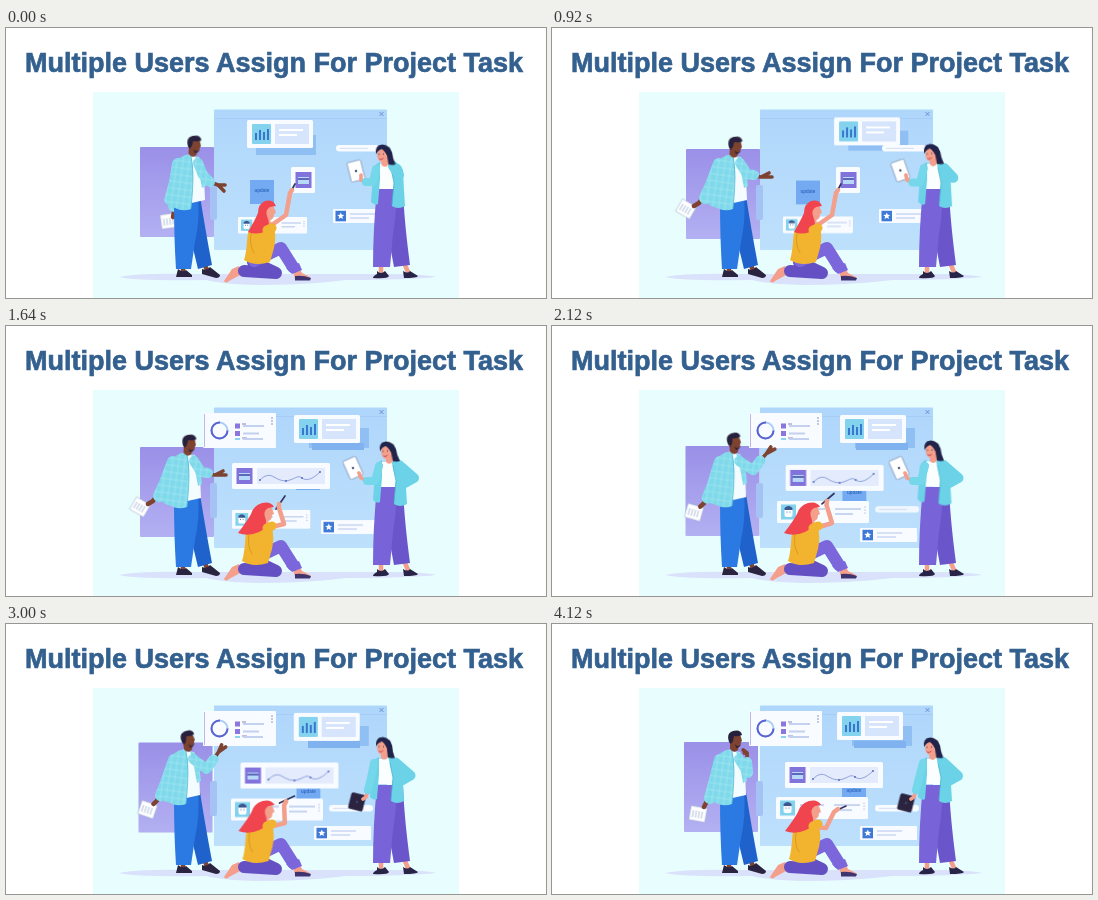
Animation, 540 px wide and 270 px high, one loop 4.16 s. Source, as an HTML page without scripts:

```html
<!DOCTYPE html>
<html lang="en">
<head>
<meta charset="utf-8">
<title>Project tasks</title>
<style>
html, body { margin: 0; width: 100%; height: 100%; overflow: hidden; background: #fff; }
svg { display: block; width: 540px; height: 270px; }
.title { font: bold 27px "Liberation Sans", Arial, sans-serif; fill: #33608f; stroke: #33608f; stroke-width: .7; }
.m { animation: 4.16s ease-in-out infinite; }
.line { fill: none; stroke-linecap: round; stroke-linejoin: round; }
.dark { --skin: #7d4330; }
.fair { --skin: #f39f8b; }
.skin { fill: var(--skin); }
.limb { stroke: var(--skin); stroke-width: 4.5; }
.card { fill: #f8fbff; }

/* Board */
#side { animation-name: side; }
@keyframes side {
  0% { transform: translate(134px, 119px); }
  13.5%, 39.4% { transform: translate(134px, 121px); }
  62.5% { transform: translate(133px, 119px); }
  82%, 100% { transform: translate(132px, 118px); }
}
#bars, #shade { animation-timing-function: cubic-bezier(.65, 0, .35, 1); }
#bars { animation-name: bars; }
@keyframes bars {
  0%, 5.4% { transform: translate(241px, 92px); }
  29.8%, 62.5% { transform: translate(288px, 89px); }
  100% { transform: translate(285px, 88px); }
}
#shade { animation-name: shade; }
@keyframes shade {
  0%, 5.4% { transform: translate(250px, 107px); }
  29.8%, 62.5% { transform: translate(303px, 102px); }
  100% { transform: translate(300px, 102px); }
}
#strip { animation-name: strip; }
@keyframes strip {
  0%, 29.8% { transform: translate(330px, 117px); opacity: 0; }
  39.4% { transform: translate(306px, 117px); opacity: 1; }
  62.5%, 100% { transform: translate(302px, 117px); opacity: 1; }
}
#pill { animation-name: pill; }
@keyframes pill {
  0%, 29.8% { transform: translate(330px, 117px); opacity: 1; }
  37% { transform: translate(330px, 124px); opacity: 0; }
  45% { transform: translate(324px, 174px); opacity: 0; }
  53%, 100% { transform: translate(323px, 181px); opacity: 1; }
}
#note { animation-name: note; }
@keyframes note {
  0%, 13.5% { transform: translate(244px, 152px); }
  30% { transform: translate(244px, 153px); }
  39.4%, 41% { transform: translate(290px, 140px); }
  53%, 82% { transform: translate(290.5px, 157px); }
  100% { transform: translate(290px, 156px); }
}
#plot { animation-name: plot; }
@keyframes plot {
  0% { transform: translate(285px, 139px); }
  13.5%, 26% { transform: translate(284px, 139px); animation-timing-function: ease-in; }
  29.8% { transform: translate(280px, 139px); animation-timing-function: ease-out; }
  39.4% { transform: translate(226px, 137px); }
  53%, 62.5% { transform: translate(234px, 139px); }
  82% { transform: translate(235px, 138px); }
  100% { transform: translate(233px, 138px); }
}
#plotbox { animation-name: plotbox; }
@keyframes plotbox {
  0%, 26% { width: 24px; animation-timing-function: ease-in; }
  29.8% { width: 34px; animation-timing-function: ease-out; }
  39.4%, 100% { width: 98px; }
}
#curve { animation-name: curve; }
@keyframes curve {
  0%, 34% { opacity: 0; }
  39%, 100% { opacity: 1; }
}
#ring { animation-name: ring; }
@keyframes ring {
  0%, 23% { transform: translate(198px, 92px); opacity: 0; }
  29%, 100% { transform: translate(197px, 87px); opacity: 1; }
}
#ringfill { animation-name: ringfill; }
@keyframes ringfill {
  0%, 30% { opacity: 0; }
  38%, 100% { opacity: 1; }
}
#arc { animation-name: arc; stroke-dasharray: 38 100; }
@keyframes arc {
  0%, 30% { stroke-dashoffset: 38; }
  39.4%, 100% { stroke-dashoffset: 0; }
}
#row { animation-name: row; }
@keyframes row {
  0%, 13.5% { transform: translate(232px, 189px) scale(.75); }
  29.8% { transform: translate(230px, 188px) scale(.77); animation-timing-function: ease-in; }
  39.4% { transform: translate(226px, 184px) scale(.85); animation-timing-function: ease-out; }
  51%, 62.5% { transform: translate(225px, 175px) scale(1); }
  82% { transform: translate(225px, 174px) scale(1); }
  100% { transform: translate(224px, 173px) scale(1); }
}
#star { animation-name: star; }
@keyframes star {
  0%, 28% { transform: translate(327px, 181px); animation-timing-function: ease-in; }
  39.4% { transform: translate(315px, 194px); animation-timing-function: ease-out; }
  51%, 100% { transform: translate(308px, 202px); }
}

/* Man */
#mtop { animation-name: mtop; }
@keyframes mtop {
  0% { transform: translate(5px, 0); }
  13.5%, 41% { transform: translate(1px, 0); }
  54%, 100% { transform: translate(0, -1px); }
}
#mhead { animation-name: mhead; }
@keyframes mhead {
  0% { transform: translate(188px, 118px) rotate(4deg); }
  13.5%, 41% { transform: translate(183px, 119px) rotate(4deg); }
  54%, 82% { transform: translate(182px, 117px) rotate(-7deg); }
  100% { transform: translate(183px, 117px) rotate(0deg); }
}
#sheet { animation-name: sheet; }
@keyframes sheet {
  0% { transform: translate(163px, 193px) rotate(-8deg); }
  13.5%, 41% { transform: translate(134px, 181px) rotate(30deg); }
  54%, 62.5% { transform: translate(143px, 187px) rotate(14deg); }
  82% { transform: translate(140px, 184px) rotate(24deg); }
  100% { transform: translate(146px, 190px) rotate(10deg); }
}
#mback { animation-name: mback; }
@keyframes mback {
  0% { d: path("M172 136L168 162L168 178"); }
  13.5%, 41% { d: path("M167 136L159 157L153 170"); }
  54%, 62.5% { d: path("M168 136L161 160L156 172"); }
  82% { d: path("M168 136L159 158L154 171"); }
  100% { d: path("M168 136L162 160L158 174"); }
}
#mbackhand { animation-name: mbackhand; }
@keyframes mbackhand {
  0% { d: path("M168 176L168 184L167 189"); }
  13.5%, 41% { d: path("M152 168L147 175L142 178"); }
  54%, 62.5% { d: path("M156 171L153 177L149 181"); }
  82% { d: path("M153 170L149 176L146 179"); }
  100% { d: path("M158 173L154 179L152 183"); }
}
#marm { animation-name: marm; }
@keyframes marm {
  0% { d: path("M192 135L197 147L204 154"); }
  13.5%, 41% { d: path("M188 135L195 146L202 147"); }
  54%, 62.5% { d: path("M187 135L202 144L209 133"); }
  82%, 85% { d: path("M187 135L199 146L206 138"); }
  100% { d: path("M187 135L196 149L195 138"); }
}
#mhand { animation-name: mhand; }
@keyframes mhand {
  0% { d: path("M204 154L212 157L219 157M212 157L218 163"); }
  13.5%, 41% { d: path("M202 148L209 149L217 145M209 149L220 149"); }
  54%, 62.5% { d: path("M209 133L215 125L219 118M215 125L223 120"); }
  82%, 85% { d: path("M206 138L210 131L212 124M210 131L216 126"); }
  100% { d: path("M195 138L195 129L191 126M195 129L192 129"); }
}

/* Kneeling woman */
#ktop { animation-name: ktop; }
@keyframes ktop {
  0%, 29.8% { transform: translate(0, 0); }
  39.4%, 62.5% { transform: translate(-2px, 3px); }
  82%, 100% { transform: translate(-1px, 3px); }
}
#khair { animation-name: khair; }
@keyframes khair {
  0%, 29.8% { d: path("M270 178Q267 171 259 173Q252 176 252 185Q249 192 242 204Q249 207 258 204Q266 200 261 188Q259 182 264 179Z"); }
  39.4%, 100% { d: path("M270 178Q267 172 258 174Q249 177 247 185Q244 191 234 204Q244 208 255 203Q265 199 261 188Q259 182 264 179Z"); }
}
#karm { animation-name: karm; }
@keyframes karm {
  0%, 29.8% { d: path("M263 199L280 187L284 165L286 162"); }
  39.4% { d: path("M261 202L278 198L273 182L273 178"); }
  62.5%, 68% { d: path("M261 204L282 196L276 176L277 172"); }
  78%, 82% { d: path("M261 203L273 205L282 191L286 187"); }
  100% { d: path("M261 203L274 204L282 188L286 185"); }
}
#pencil { animation-name: pencil; }
@keyframes pencil {
  0%, 29.8% { d: path("M283 167L289 156"); }
  39.4% { d: path("M270 183L279 170"); }
  62.5%, 68% { d: path("M270 173L285 165"); }
  78%, 82% { d: path("M280 190L295 185"); }
  100% { d: path("M281 188L294 182"); }
}

/* Standing woman */
#shead { animation-name: shead; }
@keyframes shead {
  0%, 13.5% { transform: translate(376px, 126px) rotate(-3deg); }
  29.8%, 39.4% { transform: translate(380px, 125px) rotate(-5deg); }
  62.5% { transform: translate(377px, 123px) rotate(0deg); }
  82% { transform: translate(375px, 122px) rotate(2deg); }
  100% { transform: translate(378px, 123px) rotate(-2deg); }
}
#sbody { animation-name: sbody; }
@keyframes sbody {
  0%, 13.5% { transform: translate(0, 0); }
  29.8%, 39.4% { transform: translate(2px, 0); }
  62.5%, 82% { transform: translate(-1px, -1px); }
  100% { transform: translate(1px, -1px); }
}
#sright { animation-name: sright; }
@keyframes sright {
  0%, 13.5% { d: path("M391 141L393 147L387 138"); }
  29.8%, 39.4% { d: path("M393 139L408 152L399 157"); }
  62.5% { d: path("M390 139L405 152L396 157"); }
  82% { d: path("M389 138L404 151L394 157"); }
  100% { d: path("M391 138L406 152L397 157"); }
}
#sleft { animation-name: sleft; }
@keyframes sleft {
  0%, 13.5% { d: path("M370 141L367 154L360 154"); }
  29.8%, 54% { d: path("M373 140L369 155L361 155"); animation-timing-function: ease-in; }
  62.5% { d: path("M370 140L369 156L362 159"); animation-timing-function: ease-out; }
  71%, 82% { d: path("M368 139L365 154L362 166"); }
  100% { d: path("M371 139L367 154L364 166"); }
}
#shand { animation-name: shand; }
@keyframes shand {
  0%, 13.5% { d: path("M360 154L355 152L355 147"); }
  29.8%, 54% { d: path("M361 155L355 152L353 147"); animation-timing-function: ease-in; }
  62.5% { d: path("M362 159L357 161L350 161"); animation-timing-function: ease-out; }
  71%, 82% { d: path("M362 166L360 173L357 175"); }
  100% { d: path("M364 166L362 173L359 175"); }
}
#pad { animation-name: pad; }
@keyframes pad {
  0%, 13.5% { transform: translate(350px, 143px) rotate(-14deg) scale(1); fill: #fff; stroke: #8fa3c4; }
  29.8%, 54% { transform: translate(347px, 142px) rotate(-24deg) scale(1); fill: #fff; stroke: #8fa3c4; animation-timing-function: ease-in; }
  62.5% { transform: translate(345px, 159px) rotate(9deg) scale(1.7, .2); fill: #2b2440; stroke: #2b2440; animation-timing-function: ease-out; }
  71%, 82% { transform: translate(351px, 178px) rotate(14deg) scale(1, .8); fill: #2b2440; stroke: #2b2440; }
  100% { transform: translate(354px, 179px) rotate(14deg) scale(1, .8); fill: #2b2440; stroke: #2b2440; }
}
</style>
</head>
<body>
<svg viewBox="0 0 540 270">
  <defs>
    <linearGradient id="violet" x1="0" y1="0" x2="0" y2="1">
      <stop offset="0" stop-color="#9a90e8"/><stop offset="1" stop-color="#b3b0f2"/>
    </linearGradient>
    <linearGradient id="sky" x1="0" y1="0" x2="0" y2="1">
      <stop offset="0" stop-color="#afd6fb"/><stop offset="1" stop-color="#bde0fc"/>
    </linearGradient>
    <pattern id="plaid" width="6" height="7" patternUnits="userSpaceOnUse" patternTransform="rotate(8)">
      <path d="M0 0H6V7H0Z" fill="#7fd9ea"/>
      <path d="M0 3H6M3 0V7" stroke="#a0e6f2" stroke-width=".8"/>
    </pattern>
  </defs>

  <rect width="540" height="270" fill="#fff"/>
  <text class="title" x="19" y="44">Multiple Users Assign For Project Task</text>
  <rect x="87" y="64" width="366" height="206" fill="#e8fdfe"/>
  <path d="M113 249Q135 245 180 246H380Q420 246 430 249Q405 252 340 252Q300 257 250 257Q215 256 200 252Q130 253 113 249Z" fill="#d9e2fa"/>

  <g id="side" class="m">
    <rect width="74" height="90" rx="1" fill="url(#violet)"/>
  </g>

  <rect x="208" y="81.500" width="173" height="140.500" rx="1" fill="url(#sky)"/>
  <path d="M208 90.500H381" stroke="#a2cbf5" stroke-width=".8"/>
  <path d="M373.500 84L377.500 88M377.500 84L373.500 88" stroke="#5785c8" stroke-width=".8"/>
  <rect x="204" y="157" width="7" height="35" rx="2" fill="#a4c3f4"/>

  <rect id="shade" class="m" width="60" height="20" fill="#8fbff3"/>
  <rect id="strip" class="m" width="52" height="7" fill="#7fb2ef"/>

  <g id="bars" class="m">
    <rect class="card" width="66" height="28" rx="1.500"/>
    <rect x="5" y="4" width="19" height="20" rx="1" fill="#84d3ee"/>
    <path d="M9 20V13M13 20V10M17 20V12M21 20V9" stroke="#3a76cf" stroke-width="2"/>
    <rect x="28" y="4" width="34" height="20" fill="#d6e4fc"/>
    <path d="M32 10H56M32 15H50" stroke="#fff" stroke-width="2"/>
  </g>

  <g id="pill" class="m">
    <rect class="card" width="44" height="6.500" rx="3.200"/>
    <path d="M4 3.300H32" stroke="#d4def2"/>
  </g>

  <g id="note" class="m">
    <rect width="24" height="24" fill="#74aaf1"/>
    <text x="12" y="12" text-anchor="middle" font-family="Liberation Sans, Arial, sans-serif" font-size="4.500" font-weight="bold" fill="#326ac2">update</text>
  </g>

  <g id="plot" class="m">
    <rect id="plotbox" class="card m" width="24" height="26" rx="1.500"/>
    <rect x="4.500" y="5" width="16" height="16" fill="#8272db"/>
    <rect x="7" y="10" width="11" height="7" fill="#b6d9fa"/>
    <path d="M7 12H18" stroke="#3f459f" stroke-width="1.500"/>
    <g id="curve" class="m">
      <rect x="25" y="5" width="68" height="16" fill="#e3ebfc"/>
      <path class="line" d="M28 17C33 12 37 11 42 14S52 19 58 17S66 12 70 15S80 17 88 9" stroke="#7a8fd2" stroke-width=".8"/>
      <path class="line" d="M28 17h0M54 18h0M70 15h0M88 9h0" stroke="#4966bd" stroke-width="1.800"/>
    </g>
  </g>

  <g id="row" class="m">
    <rect class="card" width="92" height="22" rx="1.500"/>
    <rect x="4" y="3.500" width="15" height="15" fill="#84d3ee"/>
    <rect x="7.500" y="7" width="8" height="9" rx="2" fill="#fff"/>
    <path d="M7.500 7Q11.500 3 15.500 7V9H7.500Z" fill="#3c568f"/>
    <path class="line" d="M10 11h0M13 11h0" stroke="#3c568f" stroke-width="1.200"/>
    <path d="M24 8H48M24 13H42M58 8H84M58 13H76" stroke="#c9d6f2" stroke-width="1.800"/>
    <path class="line" d="M88 6h0M88 9h0M88 12h0" stroke="#8c9bcb" stroke-width="1.200"/>
  </g>

  <g id="star" class="m">
    <rect class="card" width="57" height="14" rx="1"/>
    <rect x="2.500" y="1.800" width="10.500" height="10.500" fill="#3d79d5"/>
    <path d="M7.750 3.500l1 2.300 2.500.2-1.900 1.600.6 2.500-2.200-1.400-2.200 1.400.6-2.500-1.900-1.600 2.500-.2Z" fill="#fff"/>
    <path d="M17 5H42M17 9H36" stroke="#c9d6f2" stroke-width="1.600"/>
  </g>

  <g id="ring" class="m">
    <rect class="card" width="73" height="35" rx="1"/>
    <path d="M1.500 1V34" stroke="#b9b7ee" stroke-width="1"/>
    <path class="line" d="M69 5h0M69 8h0M69 11h0" stroke="#6e80b5" stroke-width="1.500"/>
    <path d="M39 11H43M39 25H44" stroke="#8c83c4" stroke-width="1"/>
    <g id="ringfill" class="m">
      <circle cx="16.500" cy="17.500" r="8" fill="none" stroke="#a9cdf6" stroke-width="2"/>
      <circle id="arc" class="m" cx="16.500" cy="17.500" r="8" fill="none" stroke="#5a62d2" stroke-width="2"/>
      <path d="M32 10.500h5v5h-5ZM32 18h5v5h-5Z" fill="#8a76dc"/>
      <path d="M32 25h5v2h-5Z" fill="#8bd3ee"/>
      <path d="M40 13H61M40 20.500H56M40 26H60" stroke="#c3d0f0" stroke-width="1.800"/>
    </g>
  </g>

  <g class="dark">
    <g id="sheet" class="m">
      <rect x="-8" y="-7" width="16" height="14" fill="#fff" stroke="#aab7d3" stroke-width=".6"/>
      <path d="M-5 -3V4M-2 -3V4M1 -3V4M4 -3V4" stroke="#9fb1d3" stroke-width=".8"/>
    </g>
    <path id="mbackhand" class="limb line m" d="M152 168L147 175L142 178"/>
    <path id="mback" class="line m" d="M167 136L159 157L153 170" stroke="url(#plaid)" stroke-width="12"/>
    <path class="limb line" d="M177 238V243M198 235L201 242"/>
    <path d="M172 241Q177 245 180 242L186 247V249H170Z M196 241Q201 243 204 239L214 247Q214 250 210 250L196 246Z" fill="#2b2440"/>
    <path d="M180 168H194Q199 200 206 237L192 241Q185 212 180 190Z" fill="#1f62cc"/>
    <path d="M168 174L192 168Q194 192 189 214L185 241H170Q168 210 168 174Z" fill="#2b79e2"/>
    <g id="mtop" class="m">
      <path d="M176 128L188 129L193 150L194 172L176 176Z" fill="#f4fcff"/>
      <path d="M179 126Q166 128 162 139L153 172Q154 177 164 180Q172 184 180 181L182 152Q183 136 179 126Z" fill="url(#plaid)"/>
      <path d="M184 128Q192 130 193 140L195 158L191 160L188 144Z" fill="url(#plaid)"/>
      <path class="line" d="M180 128Q184 146 180 180" stroke="#58bcd6" stroke-width=".8"/>
    </g>
    <g id="mhead" class="m">
      <path class="skin" d="M-5 1L4 3L3 9Q-1 13 -5 8Z"/>
      <path class="skin" d="M-4 -7Q4 -10 6 -4L7 0L6 1Q6 6 1 6Q-4 4 -5 -1Z"/>
      <path d="M-6 1Q-9 -8 -2 -10Q6 -12 7 -6Q3 -4 -1 -5L-2 0L-4 3Z" fill="#28213d"/>
      <path d="M0 3Q3 7 6 3Q5 7 1 7Z" fill="#3b2630"/>
    </g>
    <path id="mhand" class="limb line m" d="M202 148L209 149L217 145" style="stroke-width:3.600"/>
    <path id="marm" class="line m" d="M188 135L195 146L202 147" stroke="url(#plaid)" stroke-width="10"/>
  </g>

  <g class="fair">
    <path class="skin" d="M233 238L226 241L218 253Q220 256 223 253L236 246Z"/>
    <path class="skin" d="M286 240L293 239L296 245L304 249Q305 252 301 252L289 251Z"/>
    <path d="M289 248Q297 247 305 250L304 252.500H289Z" fill="#3e3570"/>
    <path class="line" d="M247 234L270 245L238 243" stroke="#6450c2" stroke-width="12"/>
    <path class="line" d="M248 233L275 220L287 239" stroke="#7c66db" stroke-width="12"/>
    <path d="M280 240L293 235L296 242L286 246Z" fill="#7c66db"/>
    <g id="ktop" class="m">
      <path d="M247 196Q257 190 267 195Q271 207 268 220L264 234Q249 239 238 232Q240 226 241 214Q241 202 247 196Z" fill="#f2b42e"/>
      <path class="line" d="M245 206Q243 217 248 225" stroke="#d99a24" stroke-width="1"/>
      <path class="skin" d="M257 186L265 188L264 197Q260 199 257 195Z"/>
      <path class="skin" d="M258 177Q267 174 269 182L270 185L268 186Q268 192 263 192Q258 190 257 184Z"/>
      <path id="khair" class="m" d="M270 178Q267 171 259 173Q252 176 252 185Q249 192 242 204Q249 207 258 204Q266 200 261 188Q259 182 264 179Z" fill="#f0444f"/>
    </g>
    <path id="pencil" class="line m" d="M283 167L289 156" stroke="#353760" stroke-width="1.700"/>
    <path id="karm" class="limb line m" d="M263 199L280 187L284 165L286 162"/>
    <path class="line" d="M261 202L266 200" stroke="#f2b42e" stroke-width="9"/>
  </g>

  <g class="fair">
    <path class="limb line" d="M375 237V244M399 237L402 244"/>
    <path d="M371 243Q375 247 379 243L383 248Q382 251 367 250Q367 248 371 246Z M397 243Q402 246 404 243L412 248Q411 250 398 250Z" fill="#272448"/>
    <path d="M383 161H397Q398 192 404 237L388 239L380 196Z" fill="#6a55ca"/>
    <path d="M371 161H390Q391 185 387 206L384 239H367Q367 201 371 161Z" fill="#7963d9"/>
    <g id="sbody" class="m">
      <path d="M371 136H387L389 161H371Z" fill="#fafeff"/>
      <path d="M374 134Q366 137 367 147L365 174Q369 178 372 176L374 151Z" fill="#6bd2e8"/>
      <path d="M383 133Q394 134 397 142L398 162L399 178Q392 182 386 178L388 154Z" fill="#6bd2e8"/>
      <path class="line" d="M385 140L388 155L386 176" stroke="#48b4cf" stroke-width=".8"/>
    </g>
    <path id="sright" class="line m" d="M391 141L393 147L387 138" stroke="#6bd2e8" stroke-width="10"/>
    <g id="shead" class="m">
      <path d="M-4 -8Q2 -12 8 -6Q11 -1 11 5L13 11Q7 13 3 8Z" fill="#20234a"/>
      <path class="skin" d="M-1 3L5 2L6 11Q2 15 -1 11Z"/>
      <path class="skin" d="M-4 -5Q3 -8 6 -2Q6 8 0 8.500Q-4 7 -5 2Z"/>
      <path d="M-6 0Q-7 -9 0 -9Q7 -9 8 0L6 5Q4 -2 0 -5Q-4 -4 -6 0Z" fill="#20234a"/>
      <path class="line" d="M-3 5Q-1 6.500 1 4.500" stroke="#c84f5a" stroke-width="1"/>
      <path class="line" d="M-3 0h0M1.500 0h0" stroke="#20234a" stroke-width="1.200"/>
    </g>
    <g id="pad" class="m" fill="#fff" stroke="#8fa3c4">
      <rect x="-7" y="-10" width="14" height="20" rx="1.500" stroke-width="1"/>
      <circle r="1.200" fill="#45506d" stroke="none"/>
    </g>
    <path id="shand" class="limb line m" d="M360 154L355 152L355 147" style="stroke-width:3.600"/>
    <path id="sleft" class="line m" d="M370 141L367 154L360 154" stroke="#74d7ea" stroke-width="8"/>
  </g>
</svg>
</body>
</html>
```
